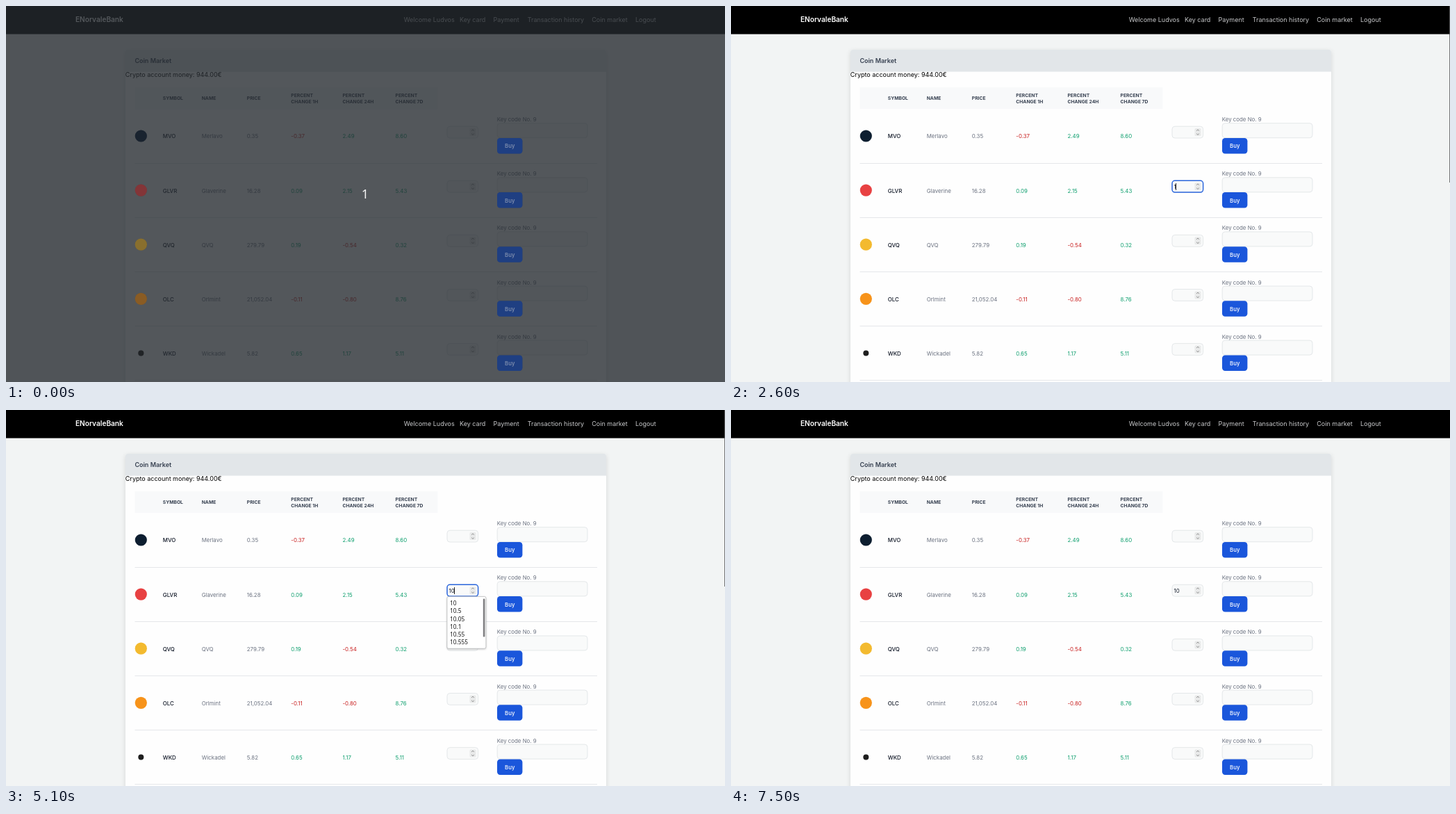
An HTML page with a canvas that plays this animation: 1035x541 px, repeating every 8 s.

```html
<!DOCTYPE html>
<html lang="en">
<head>
<meta charset="utf-8">
<title>Coin Market</title>
<style>
  html, body { margin: 0; width: 100%; height: 100%; overflow: hidden; background: #f2f4f4; }
  canvas { display: block; width: 1035px; height: 541px; }
</style>
</head>
<body>
<canvas id="stage" width="1035" height="541"></canvas>
<script>
const ctx = document.getElementById('stage').getContext('2d');
const W = 1035, H = 541, LOOP = 8000;
const INTER = 'Inter, sans-serif', MENU = '"Noto Sans", sans-serif';
const SMALL = 7.875, BASE = 9;
const GRAY = '#6b7280', INK = '#111827', SLATE = '#374151';
const GREEN = '#0e9f6e', RED = '#c81e1e', BLUE = '#1a56db';
const ROW_TOP = 148.2, ROW_STEP = 78.1, ACTIVE_ROW = 1;

const links = [
  ['Welcome Ludvos', 572.7], ['Key card', 653], ['Payment', 701.6],
  ['Transaction history', 750.7], ['Coin market', 843.3], ['Logout', 906]
];
const headings = [
  ['SYMBOL', 225.8], ['NAME', 281.7], ['PRICE', 346.8],
  ['PERCENT|CHANGE 1H', 410.3], ['PERCENT|CHANGE 24H', 484.5], ['PERCENT|CHANGE 7D', 560.6]
];
const coins = [
  ['MVO', 'Merlavo', '0.35', ['-0.37', '2.49', '8.60'], '#0d1e30', 8.6],
  ['GLVR', 'Glaverine', '16.28', ['0.09', '2.15', '5.43'], '#e84142', 8.6],
  ['QVQ', 'QVQ', '279.79', ['0.19', '-0.54', '0.32'], '#f3ba2f', 8.6],
  ['OLC', 'Orlmint', '21,052.04', ['-0.11', '-0.80', '8.76'], '#f7931a', 8.6],
  ['WKD', 'Wickadel', '5.82', ['0.65', '1.17', '5.11'], '#1e1e1e', 4]
];
const suggestions = ['10', '10.5', '10.05', '10.1', '10.55', '10.555'];

// y is the middle of the capitals
function text(str, x, y, size, color, weight = 400, family = INTER) {
  ctx.font = `${weight} ${size}px ${family}`;
  ctx.fillStyle = color;
  ctx.fillText(str, x, y + size * 0.364);
}

function box(x, y, w, h, r, fill, stroke, line = 1) {
  ctx.beginPath();
  ctx.roundRect(x, y, w, h, r);
  if (fill) { ctx.fillStyle = fill; ctx.fill(); }
  if (stroke) { ctx.strokeStyle = stroke; ctx.lineWidth = line; ctx.stroke(); }
}

function withShadow(color, blur, dy, draw) {
  ctx.save();
  ctx.shadowColor = color;
  ctx.shadowBlur = blur;
  ctx.shadowOffsetY = dy;
  draw();
  ctx.restore();
}

function spinner(x, y) {
  box(x - 4.5, y - 5.5, 9, 11, 1.5, '#e9eaea');
  ctx.strokeStyle = '#777';
  ctx.lineWidth = 0.8;
  for (const dir of [-1, 1]) {
    ctx.beginPath();
    ctx.moveTo(x - 1.9, y + dir * 2);
    ctx.lineTo(x, y + dir * 3.8);
    ctx.lineTo(x + 1.9, y + dir * 2);
    ctx.stroke();
  }
}

function badge(coin, top) {
  ctx.beginPath();
  ctx.arc(194.3, top + 38.8, coin[5], 0, Math.PI * 2);
  ctx.fillStyle = coin[4];
  ctx.fill();
}

function buyButton(top) {
  box(707, top + 41.8, 36.4, 22.5, 4.3, BLUE);
  text('Buy', 718, top + 53.4, SMALL, '#fff', 500);
}

const rowTop = i => ROW_TOP + i * ROW_STEP;

function coinRow(coin, i) {
  const top = rowTop(i), mid = top + 39.4;
  const [symbol, name, price, changes] = coin;
  badge(coin, top);
  text(symbol, 225.8, mid, SMALL, INK, 500);
  text(name, 281.7, mid, SMALL, GRAY);
  text(price, 346.8, mid, SMALL, GRAY);
  changes.forEach((change, k) =>
    text(change, headings[k + 3][1], mid, SMALL, change[0] === '-' ? RED : GREEN));
  box(635, top + 25, 44.6, 16.8, 4, '#f9fafa', '#dfe2e5', 0.8);
  spinner(672, top + 33.4);
  text('Key code No. 9', 706.8, top + 15.2, SMALL, GRAY);
  box(707.2, top + 20.5, 129.8, 21, 4, '#f9fafa', '#dfe2e5', 0.8);
  buyButton(top);
  ctx.fillStyle = '#e5e7ea';
  ctx.fillRect(185.5, Math.round(top + 77.6), 665.5, 1);
}

function page() {
  ctx.fillStyle = '#f2f4f4';
  ctx.fillRect(0, 0, W, H);
  ctx.fillStyle = '#000';
  ctx.fillRect(0, 0, W, 40.5);
  text('ENorvaleBank', 100, 19.7, 10.125, '#fff', 600);
  for (const [label, x] of links) text(label, x, 19.5, BASE, '#c8c9cb');

  withShadow('rgba(0,0,0,.12)', 7, 2, () => box(172, 63, 692, 520, 3.4, '#fefefe'));
  box(172, 63, 692, 31.5, [3.4, 3.4, 0, 0], '#e2e6e9');
  text('Coin Market', 185.4, 78.8, BASE, SLATE, 600);
  text('Crypto account money: 944.00€', 171.8, 99.2, BASE, '#000');

  ctx.fillStyle = '#f8f9fa';
  ctx.fillRect(185.5, 117, 435.8, 31.3);
  for (const [label, x] of headings) {
    const lines = label.split('|');
    lines.forEach((line, k) =>
      text(line, x, 133 + (k - (lines.length - 1) / 2) * 9, 6.75, SLATE, 700));
  }
  coins.forEach(coinRow);
}

function pageScrollbar(t) {
  if (t < 500) return box(1031.2, 0, 3.6, 253.5, 1.8, 'rgba(80,80,82,.9)');
  let alpha = 0;
  if (t < 2900) alpha = 1;
  else if (t < 3200) alpha = 1 - (t - 2800) / 400;
  else if (t >= 5100 && t < 7000) alpha = 1;
  else if (t >= 7000) alpha = Math.max(0, 1 - (t - 6900) / 600);
  ctx.fillStyle = `rgba(95,95,97,${alpha * 0.85})`;
  ctx.fillRect(1034, 0, 1, 254);
}

function typedValue(t) {
  if (t < 2600) return '';
  if (t < 2900) return '1';
  if (t < 3200) return '10';
  return t < 4300 ? '100' : '10';
}

function caretVisible(t) {
  return !(t >= 4100 && t < 4300) && !(t >= 5300 && t < 6500);
}

function activeInput(t) {
  const y = rowTop(ACTIVE_ROW) + 33.4, focused = t >= 1700 && t < 7000;
  const value = typedValue(t);
  if (focused) {
    box(635, y - 8.4, 44.6, 16.8, 4, '#f9fafa', '#2b66dc', 1.5);
    spinner(672, y);
  }
  text(value, 637.5, y + 0.2, SMALL, INK);
  if (focused && caretVisible(t)) {
    ctx.font = `400 ${SMALL}px ${INTER}`;
    ctx.fillStyle = '#222';
    ctx.fillRect(Math.floor(637.6 + ctx.measureText(value).width + (value ? 0 : 0.4)), 255, 1, 10);
  }
}

function dropdown(t) {
  if (t < 2700 || t >= 7000) return;
  const single = t >= 3200 && t < 4400;
  const items = single ? ['1000'] : suggestions;
  const height = 7.6 + items.length * 11.2;
  withShadow('rgba(0,0,0,.25)', 3, 1, () => box(634.9, 268.4, 56, height, 2.2, '#fff'));
  box(634.9, 268.4, 56, height, 2.2, null, '#b9babc', 0.8);
  items.forEach((item, k) => text(item, 639, 278.1 + k * 11.22, 8.3, '#1a1a1a', 500, MENU));
  if (single) return;
  const alpha = t < 5300 ? 1 : Math.max(0, 1 - (t - 5200) / 600);
  if (alpha) box(686.8, 271.5, 2.6, 55, 1.3, `rgba(95,95,97,${alpha * 0.8})`);
}

function countdown() {
  ctx.fillStyle = 'rgba(38,42,48,.79)';
  ctx.fillRect(0, 0, W, H);
  ctx.globalAlpha = 0.35;
  coins.forEach((coin, i) => {
    badge(coin, rowTop(i));
    buyButton(rowTop(i));
  });
  ctx.globalAlpha = 1;
  ctx.textAlign = 'center';
  text('1', 516.8, 270.8, 18, '#f4f4f4', 400, MENU);
  ctx.textAlign = 'left';
}

function render(now) {
  const t = Math.floor((now % LOOP) / 100) * 100;
  page();
  if (t < 100) {
    countdown();
  } else {
    pageScrollbar(t);
    activeInput(t);
    dropdown(t);
  }
}

const start = performance.now();
function tick() {
  render(performance.now() - start);
  requestAnimationFrame(tick);
}
tick();
</script>
</body>
</html>
```
